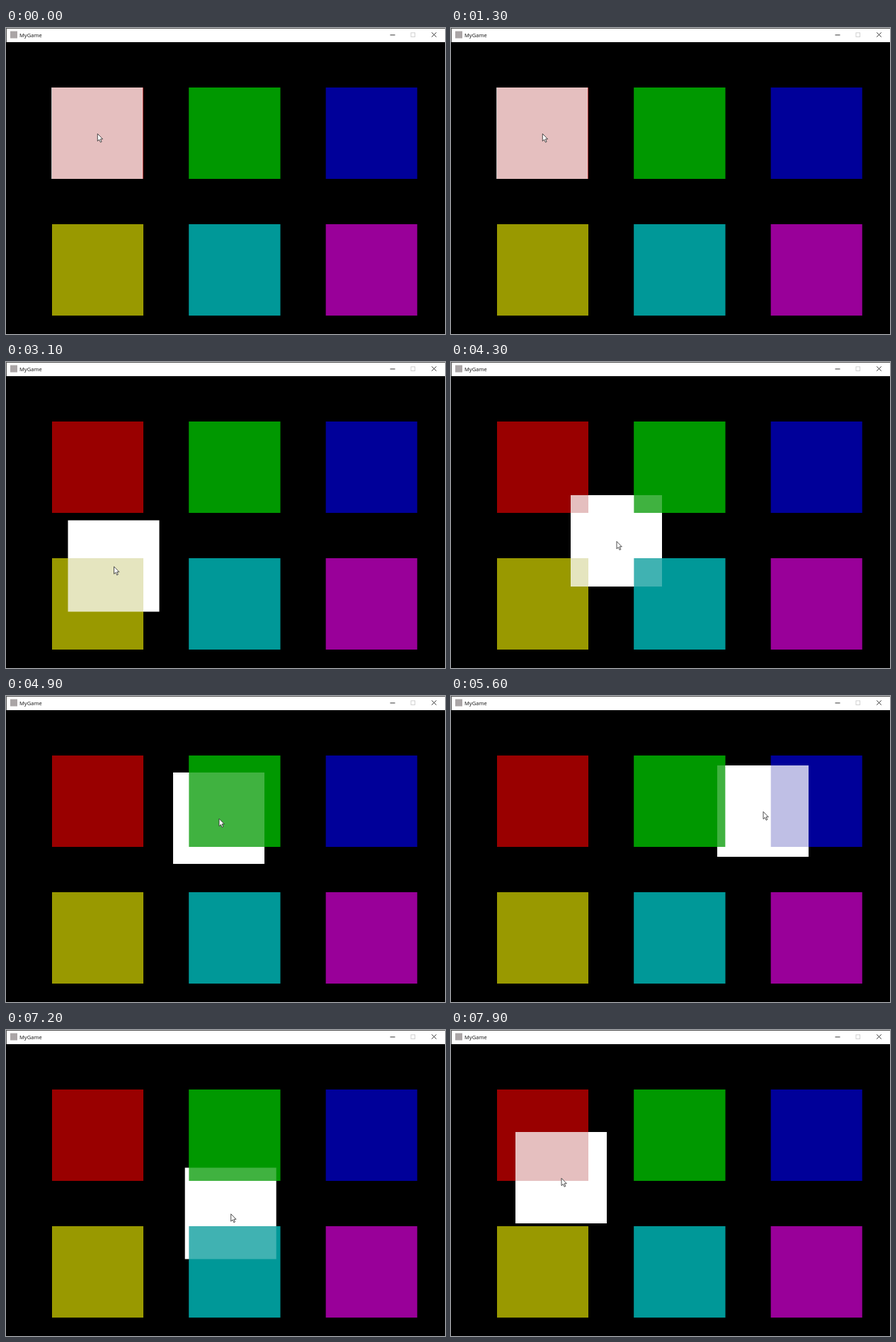
These frames come from a looping animation (620x432 px, 8000 ms). An HTML page:

```html
<!DOCTYPE html>
<html lang="en">
<head>
<meta charset="utf-8">
<title>MyGame</title>
<style>
  html, body { margin: 0; width: 100%; height: 100%; overflow: hidden; background: #000; }
  svg { display: block; width: 100%; height: 100%; }
  text { font: 7.6px "Open Sans", "Noto Sans", sans-serif; fill: #111; }
</style>
</head>
<body>
<svg viewBox="0 0 620 432">
  <rect width="620" height="432"/>
  <g id="tiles"></g>
  <rect id="box" width="129" height="129" fill="#fff"/>
  <g id="tints"></g>
  <rect width="620" height="20" fill="#fff"/>
  <path d="M0 .5H620M.5 0V20" stroke="#555"/>
  <rect x="6" y="4.5" width="10" height="10" fill="#aaa5a6"/>
  <text x="19" y="12.7">MyGame</text>
  <g fill="none" stroke="#222" stroke-width=".9">
    <path d="M542.5 9.9H549.5M601.3 6.3L607.7 12.7M607.7 6.3L601.3 12.7"/>
    <rect x="572" y="6.8" width="5.6" height="5.6" stroke="#ccc"/>
  </g>
  <path id="cursor" d="M0 0V10.4L2.4 8.2L4.1 12L5.8 11.2L4.1 7.5H7.3Z"
        fill="#fff" stroke="#222" stroke-width=".8"/>
</svg>
<script>
const LOOP = 8000, STEP = 100, SIZE = 129;
const $ = id => document.getElementById(id);

// time, x, y of the dragged box
const path = [
  [1700, 64.3, 84], [2200, 94, 110], [2600, 111, 142], [3100, 87.5, 223.5],
  [3500, 131, 258], [4000, 158, 235], [4300, 169, 188], [4400, 171, 173],
  [4900, 236, 108], [5300, 326, 82], [5600, 376, 98], [5900, 403, 143],
  [6200, 414, 203], [6400, 399, 236.5], [6750, 350, 270], [7100, 275, 218],
  [7500, 184, 124], [7900, 91, 144]
];

function addTile(parent, col, row, color, opacity) {
  const r = document.createElementNS("http://www.w3.org/2000/svg", "rect");
  const attrs = {
    x: 65 + col * 193.35, y: 84 + row * 193,
    width: SIZE, height: SIZE, fill: color, opacity
  };
  for (const k in attrs) r.setAttribute(k, attrs[k]);
  parent.append(r);
}

// A translucent copy above the box mixes with it and leaves the tile itself unchanged
["#900", "#090", "#009", "#990", "#099", "#909"].forEach((color, i) => {
  const col = i % 3, row = Math.floor(i / 3);
  addTile($("tiles"), col, row, color, 1);
  addTile($("tints"), col, row, color, col === 1 ? 0.75 : 0.25);
});

function slope(i, axis) {
  if (i === 0 || i === path.length - 1) return 0;
  const a = path[i - 1], b = path[i], c = path[i + 1];
  const h = b[0] - a[0], k = c[0] - b[0];
  return ((b[axis] - a[axis]) / h * k + (c[axis] - b[axis]) / k * h) / (h + k);
}

// Cubic Hermite through the path points
function at(t, axis) {
  if (t <= path[0][0]) return path[0][axis];
  let i = 0;
  while (i < path.length - 2 && t > path[i + 1][0]) i++;
  const a = path[i], b = path[i + 1], d = b[0] - a[0];
  const u = Math.min(1, (t - a[0]) / d), v = 1 - u;
  return a[axis] * v * v * (1 + 2 * u) + b[axis] * u * u * (3 - 2 * u)
    + d * u * v * (slope(i, axis) * v - slope(i + 1, axis) * u);
}

function draw(now) {
  const t = Math.floor((now % LOOP) / STEP) * STEP;
  const x = at(t, 1), y = at(t, 2);
  $("box").setAttribute("x", x);
  $("box").setAttribute("y", y);
  $("cursor").setAttribute("transform", `translate(${x + 65} ${y + 65.3})`);
}

let start;
function tick(now) {
  start ??= now;
  draw(now - start);
  requestAnimationFrame(tick);
}
draw(0);
requestAnimationFrame(tick);
</script>
</body>
</html>
```
